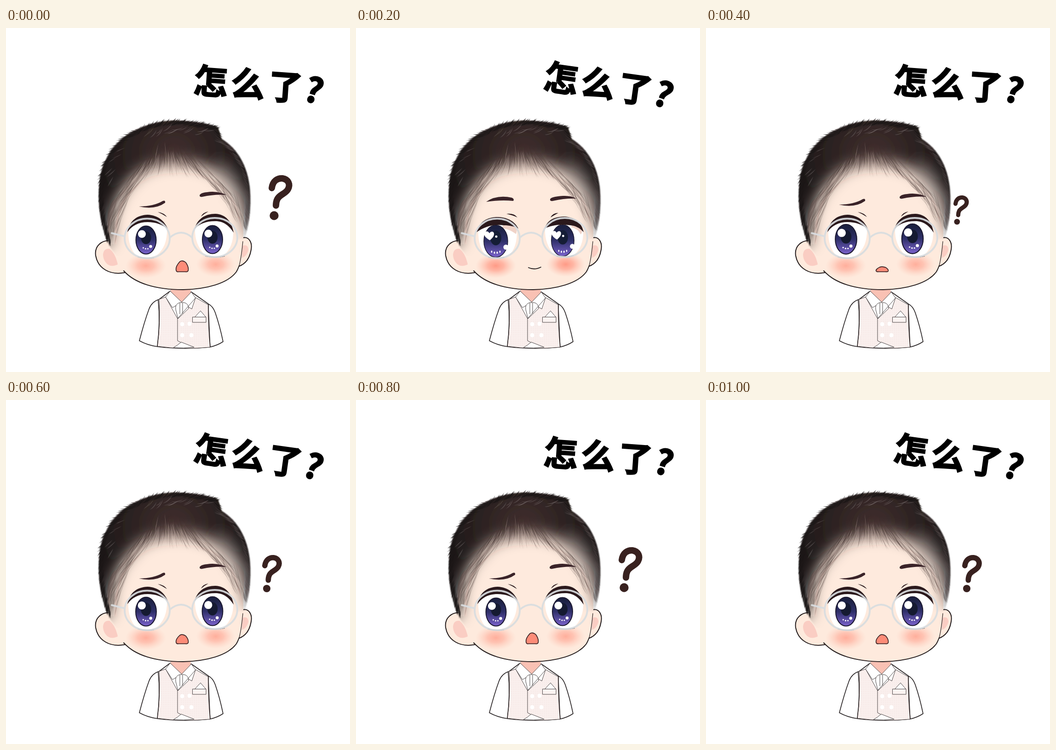
These frames come from a looping animation (748 px wide and 748 px high, 1200 ms). An HTML page:

```html
<!DOCTYPE html>
<html lang="zh">
<head>
<meta charset="utf-8">
<style>
html, body { margin: 0; width: 100%; height: 100%; overflow: hidden; background: #fff; }
svg { display: block; width: 100vw; height: 100vh; }
text { font: 900 74px "Noto Sans CJK SC", "Noto Sans CJK", sans-serif; text-anchor: middle; stroke: #000; stroke-width: 2.5; }
.line { fill: none; stroke: #231c1d; stroke-width: 2; stroke-linecap: round; stroke-linejoin: round; }
.thin { stroke: #4a4445; stroke-width: 1; stroke-linejoin: round; }
.dark { fill: #2b191c; }
.brow { fill: #3a2328; }
</style>
</head>
<body>
<svg viewBox="0 0 748 748">
<defs>
  <filter id="soft" x="-60%" y="-60%" width="220%" height="220%"><feGaussianBlur stdDeviation="16"/></filter>
  <filter id="edge"><feGaussianBlur stdDeviation="1.3"/></filter>
  <radialGradient id="hairTone" gradientUnits="userSpaceOnUse" cx="365" cy="275" r="175">
    <stop offset="0" stop-color="#43302f"/><stop offset=".45" stop-color="#2f2423"/><stop offset="1" stop-color="#1b1717"/>
  </radialGradient>
  <radialGradient id="blush">
    <stop offset="0" stop-color="#ff9a86"/><stop offset=".4" stop-color="#ffa996" stop-opacity=".8"/><stop offset="1" stop-color="#ffc4b3" stop-opacity="0"/>
  </radialGradient>
  <linearGradient id="irisTone" x2="0" y2="1">
    <stop offset=".1" stop-color="#1c2142"/><stop offset=".5" stop-color="#2f3069"/><stop offset="1" stop-color="#7a62cc"/>
  </linearGradient>
  <pattern id="weave" width="4" height="4" patternUnits="userSpaceOnUse">
    <rect width="4" height="4" fill="#faf0ee"/><circle cx="2" cy="2" r=".9" fill="#f4e5e2"/>
  </pattern>
  <clipPath id="hairClip"><path id="crown" d="M241 496C226 478 217 463 212 440C201 402 198 355 206 318C214 283 233 252 268 229C300 210 340 200 372 201C410 203 441 207 461 216L469 241C505 264 524 299 530 345C534 385 530 425 519 458"/></clipPath>
  <g id="iris">
    <ellipse rx="22" ry="30.5" fill="url(#irisTone)" stroke="#1b1830" stroke-width="2"/>
    <ellipse cy="-5" rx="11" ry="14" fill="#151a31"/>
    <g fill="#fff"><circle cx="-9" cy="-13" r="8.5"/><circle cx="10" cy="14" r="3.2"/>
      <circle cx="-6" cy="17" r="1.5"/><circle cx="-1" cy="19" r="1.6"/><circle cx="4" cy="19" r="1.5"/></g>
  </g>
  <g id="bigIris">
    <ellipse rx="26" ry="35" fill="url(#irisTone)" stroke="#1b1830" stroke-width="1.5"/>
    <ellipse cy="-7" rx="12" ry="16" fill="#151d35"/>
    <g fill="#fff"><path d="M-13 -2C-24 -8 -28 -15 -23 -20C-19 -23 -15 -20 -14 -17C-11 -22 -5 -22 -4 -17C-3 -11 -8 -6 -13 -2Z"/>
      <circle cx="1" cy="-10" r="2.5"/><circle cx="22" cy="13" r="5.5"/>
      <ellipse cx="-9" cy="23" rx="1.4" ry="2.4"/><ellipse cx="-3" cy="25" rx="1.5" ry="2.6"/><ellipse cx="3" cy="25" rx="1.5" ry="2.6"/><ellipse cx="9" cy="23" rx="1.4" ry="2.4"/></g>
  </g>
</defs>

<g id="body" stroke-linejoin="round">
  <path d="M333 590Q317 595 311 611Q301 638 290 680Q308 690 330 693Q386 700 443 694Q460 690 472 682Q465 648 455 619Q450 605 440 600L403 574L357 572Z" fill="#fff" stroke="#2a2526" stroke-width="1.7"/>
  <path d="M358 568L402 568L400 582L381 598L358 580Z" fill="#f9c1b4"/>
  <path class="thin" d="M347 585L333 590Q336 640 329 692Q386 700 444 694Q442 640 440 602L412 586L373 632Z" fill="url(#weave)"/>
  <path class="line" style="stroke-width:1.6" d="M331 592Q336 640 329 692M440 601Q440 650 444 693"/>
  <path class="thin" d="M357 572L347 585L362 608L381 597L404 611L412 587L403 574L382 596Z" fill="#fff"/>
  <path class="thin" d="M369 612Q367 600 378 597L387 597Q397 599 397 610L374 632Z" fill="#fff"/>
  <path class="thin" fill="none" d="M378 598V622M384 598V621M412 587L373 632V680L381 684"/>
  <path class="thin" fill="#fff" d="M364 695Q373 690 381 683L409 694Q386 697 364 695ZM411 628L423 615L434 628"/>
  <path class="thin" fill="#fbf3f1" d="M405.5 628.5H435V640H405.5Z"/>
  <g fill="#fff"><circle cx="383" cy="644" r="4.5"/><circle cx="399" cy="643" r="4.5"/><circle cx="383" cy="668" r="4.5"/><circle cx="403" cy="668" r="4.5"/></g>
</g>

<g id="head">
  <path class="line" style="fill:#feeadd" d="M232 463C207 459 192 475 195 495C200 523 226 538 258 532"/>
  <path d="M211 493Q212 479 225 480Q238 490 243 514Q226 522 217 510Q211 502 211 493Z" fill="#facdc3"/>
  <path class="line" style="fill:#feeadd" d="M515 456C528 453 536 466 533 482C530 501 520 513 507 518"/>
  <path d="M514 474Q526 469 527 482Q524 496 513 500Z" fill="#facdc3"/>
  <path d="M256 528C280 555 325 569 385 569C435 568 482 556 501 530Q511 512 516 460L518 330L440 240H280L220 330L222 460Q240 500 256 528Z" fill="#feeadd"/>
  <path class="line" d="M256 528C280 555 325 569 385 569C435 568 482 556 501 530Q504 525 507 517"/>
  <path class="line" style="stroke-width:1.2" d="M507 517Q512 498 515 464"/>
</g>

<g filter="url(#edge)"><g clip-path="url(#hairClip)">
  <path filter="url(#soft)" fill="url(#hairTone)" d="M150 470V150H600V445H526C518 390 500 345 456 312C410 284 332 287 292 313C248 346 222 400 226 470Z"/>
  <ellipse cx="492" cy="342" rx="16" ry="62" transform="rotate(-30 492 342)" fill="#eee0da" opacity=".4" filter="url(#soft)"/>
</g></g>
<path id="fringe" fill="none" d="M236 480C224 410 250 358 296 325C335 300 400 300 445 328C492 358 510 400 517 450"/>
<g id="strands"></g>

<g id="cheeks"><ellipse cx="304" cy="517" rx="44" ry="27" fill="url(#blush)"/><ellipse cx="456" cy="514" rx="42" ry="27" fill="url(#blush)"/></g>

<g id="worry">
  <path fill="#fff" d="M266 441Q276 415 308 414Q338 416 350 438Q351 475 328 494Q305 504 284 496Q265 476 266 441ZM411 437Q422 412 455 411Q482 413 494 442Q495 475 474 494Q450 502 432 493Q410 470 411 437Z"/>
  <g transform="translate(304.5 461)"><use class="eye" href="#iris"/></g>
  <g transform="translate(449 460)"><use class="eye" href="#iris"/></g>
  <path class="dark" d="M264 444C269 418 285 407 308 406C331 407 345 420 352 437C339 427 325 422 308 422C289 422 274 429 264 444ZM410 437C416 415 433 404 455 404C478 405 491 421 495 445C485 430 474 420 455 420C434 420 420 426 410 437Z"/>
  <path class="line" style="stroke-width:1.4" d="M287 498Q303 502 321 500M434 496Q455 501 475 496"/>
  <path class="dark" d="M330 400Q344 402 350 411Q341 405 330 400ZM440 399Q428 401 424 410Q431 404 440 399Z"/>
  <path class="brow" id="browL" d="M290 388Q322 388 342 376Q348 374 347 380Q325 396 290 388Z"/>
  <path class="brow" id="browR" d="M422 364Q423 357 450 356Q470 357 480 363Q455 361 428 367Q422 368 422 364Z"/>
  <path id="mouth" vector-effect="non-scaling-stroke" d="M370 -3Q368 -11 378 -22Q384 -26 391 -20Q398 -10 396 -2Q394 1 390 0H375Q371 1 370 -3Z" fill="#fd8c78" stroke="#2b191c" stroke-width="1.6"/>
</g>

<g id="smile">
  <path fill="#fff" d="M266 441Q276 415 308 414Q338 416 350 438Q351 478 332 495Q305 503 284 497Q265 476 266 441ZM411 437Q422 412 455 411Q482 413 494 442Q495 475 474 494Q450 500 432 495Q410 470 411 437Z"/>
  <path fill="#f0d3c8" d="M320 425L350 434Q350 442 348 448Q335 438 318 435ZM470 422L492 440Q491 446 489 449Q482 436 468 433Z"/>
  <use href="#bigIris" transform="translate(304 463.5)"/>
  <use href="#bigIris" transform="translate(449.5 462) scale(.95 .98)"/>
  <path class="dark" d="M262 444C268 421 285 411 309 411C332 412 346 422 353 436C343 431 334 429 322 429C297 426 280 432 262 444ZM410 436C417 416 433 410 455 410C477 412 491 424 495 444C486 434 477 430 466 429C442 426 426 429 410 436Z"/>
  <path class="line" style="stroke-width:1.4" d="M289 499Q303 501 322 499M436 496Q455 500 473 495"/>
  <path class="dark" d="M327 404Q344 402 351 412Q341 407 327 404ZM440 402Q428 402 423 412Q431 407 440 402Z"/>
  <path class="brow" d="M283 378Q306 362 339 369Q345 372 342 376Q315 373 283 378ZM422 373Q422 367 450 365Q468 364 479 371Q455 370 428 376Q422 377 422 373Z"/>
  <path class="line" style="stroke-width:1.8" d="M375 521Q388 527 402 520"/>
</g>

<g fill="none" stroke="#d9dde0" stroke-width="4" stroke-linecap="round" opacity=".92">
  <ellipse cx="307" cy="457.5" rx="49" ry="43"/><ellipse cx="454" cy="455.5" rx="49" ry="42.5"/>
  <path d="M356 456Q381 434 405 456M230 446L258 453"/>
</g>

<g id="ask">
  <path d="M7 28C9 12 20 6 30 7C43 9 48 20 42 31C36 41 24 42 19 52Q16 58 16 66" fill="none" stroke="#38211f" stroke-width="14" stroke-linecap="round" stroke-linejoin="round"/>
  <circle cx="12" cy="88" r="9.7" fill="#38211f"/>
</g>
<text id="words" x="445 526 608 665" y="150 150 151 149" rotate="0 0 0 12">怎么了?</text>
</svg>
<script>
const $ = id => document.getElementById(id);
let seed = 11;
const rand = (a, b) => {
  seed = (seed * 16807) % 2147483647;
  return a + (b - a) * seed / 2147483647;
};

// A lock of hair, pointed at both ends.
const strand = (x, y, dx, dy, bend, width, color, alpha) => {
  const len = Math.hypot(dx, dy), nx = -dy / len, ny = dx / len;
  const point = (px, py) => `${px.toFixed(1)} ${py.toFixed(1)}`;
  const mid = k => point(x + dx / 2 + nx * k, y + dy / 2 + ny * k);
  return `<path fill="${color}" opacity="${alpha}" d="M${point(x, y)}Q${mid(bend)} ${point(x + dx, y + dy)}Q${mid(bend + width)} ${point(x, y)}Z"/>`;
};

// Hair falling over the forehead, parted towards both temples.
function fringeStrand() {
  const fringe = $("fringe"), t = rand(.03, .97);
  const p = fringe.getPointAtLength(t * fringe.getTotalLength());
  const lean = .05 - .72 * Math.sin(2 * Math.PI * t), dx = Math.sin(lean), dy = Math.cos(lean);
  const pale = rand(0, 1) < .35, len = pale ? rand(20, 45) : rand(35, 80), over = rand(-20, 20);
  return strand(p.x + rand(-16, 10) + dx * (over - len), p.y + dy * (over - len), dx * len, dy * len,
    rand(-3, 5) * Math.sign(t - .5), rand(1, 3), pale ? "#ead2c7" : "#43332f", pale ? .28 : .3);
}

// Short tufts along the outline; a few paler ones lie further in.
function tuft(i) {
  const crown = $("crown"), t = rand(.04, .97), at = t * crown.getTotalLength();
  const p = crown.getPointAtLength(at), q = crown.getPointAtLength(at + 1);
  const tx = q.x - p.x, ty = q.y - p.y, side = t < .42 ? -1 : 1;
  const top = t > .22 && t < .68, right = t > .68, light = top && i % 9 === 0;
  const sweep = rand(14, 26) * side, depth = rand(6, 13), rise = top ? rand(-1, 6) : rand(-2, 2);
  const inset = depth + (light ? rand(9, 22) : 0);
  return strand(p.x - ty * inset - tx * sweep * .7, p.y + tx * inset - ty * sweep * .7,
    tx * sweep + ty * (depth + rise), ty * sweep - tx * (depth + rise), rand(1, 4) * side, rand(2, 4),
    light ? "#8d8583" : right ? "#5a5150" : "#1d1818", light ? .35 : right ? .3 : .7);
}

// Each pose: question mark [x, y, scale], mouth opening, iris [scale x, scale y], brow shifts.
const wide = { ask: [571, 320, 1], mouth: 1, eye: [1, 1], brows: [0, 0] };
const mild = { ask: [557, 337, .83], mouth: .84, eye: [1.02, 1.03], brows: [0, 0] };
const small = { ask: [538, 364, .65], mouth: .46, eye: [1.06, 1.06], brows: [-4, 4] };
const poses = [wide, null, small, mild, wide, mild];

const place = (id, value) => $(id).setAttribute("transform", value);
const show = (id, on) => $(id).setAttribute("visibility", on ? "visible" : "hidden");

function draw(now) {
  const step = Math.floor(now / 200) % poses.length, pose = poses[step];
  place("words", `rotate(${step % 2 ? 8 : 4} 540 124)`);
  show("worry", pose);
  show("ask", pose);
  show("smile", !pose);
  $("cheeks").setAttribute("opacity", pose ? .75 : 1);
  if (pose) {
    const [x, y, k] = pose.ask, [sx, sy] = pose.eye;
    place("ask", `translate(${x} ${y}) scale(${k})`);
    place("mouth", `translate(0 530) scale(1 ${pose.mouth})`);
    place("browL", `translate(-1 ${pose.brows[0]})`);
    place("browR", `translate(-1 ${pose.brows[1]})`);
    for (const eye of document.querySelectorAll(".eye")) eye.setAttribute("transform", `translate(0 ${(1 - sy) * 28}) scale(${sx} ${sy})`);
  }
  requestAnimationFrame(draw);
}

$("strands").innerHTML = Array.from({ length: 420 }, fringeStrand).join("") +
  Array.from({ length: 420 }, (_, i) => tuft(i)).join("");
draw(performance.now());
</script>
</body>
</html>
```
